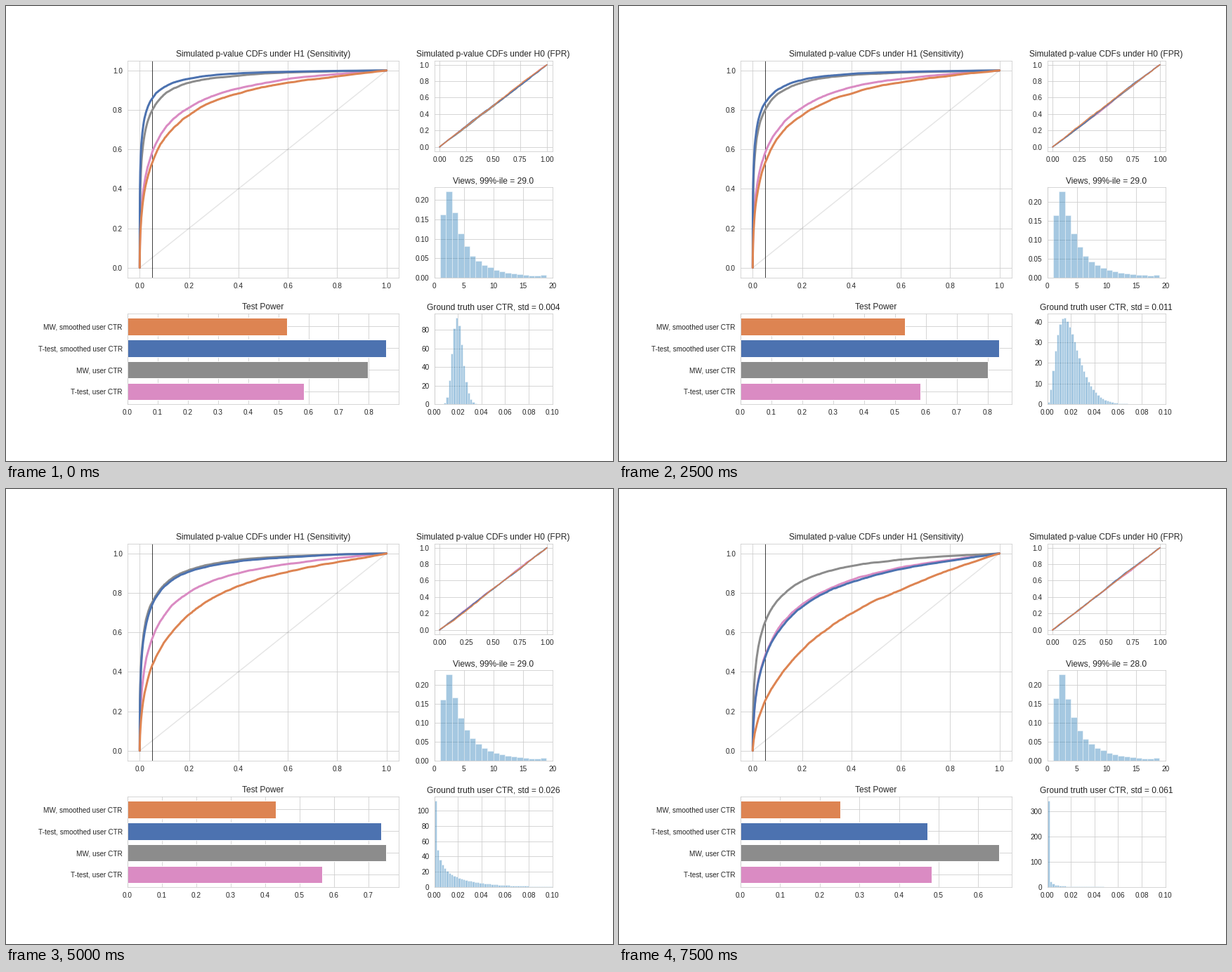
Write a matplotlib script that moves like this. It is 864x648 px and loops after 8 s.

```python
import math

import matplotlib.pyplot as plt
import numpy as np
from matplotlib.animation import FuncAnimation
from matplotlib.gridspec import GridSpec

FRAMES = 16
CTR = 0.02
PINK, GRAY, BLUE, ORANGE = COLORS = "#da8bc3", "#8c8c8c", "#4c72b0", "#dd8452"
TESTS = ["T-test, user CTR", "MW, user CTR",
         "T-test, smoothed user CTR", "MW, smoothed user CTR"]

# Power of each test at a few steps of the skew sweep
STEPS = [0, 2, 5, 7, 9, 12, 15]
POWER = [
    [0.584, 0.585, 0.5815, 0.5975, 0.573, 0.554, 0.482],
    [0.796, 0.786, 0.800, 0.783, 0.763, 0.7285, 0.652],
    [0.8567, 0.853, 0.8358, 0.8265, 0.786, 0.6435, 0.4715],
    [0.5296, 0.5155, 0.531, 0.4897, 0.4578, 0.379, 0.2524],
]
LOW_TAIL = {1, 2, 3, 12, 13, 14, 15}  # steps whose 99th percentile is 28

plt.rcParams.update({
    "font.family": "Liberation Sans",
    "text.color": "0.15",
    "axes.edgecolor": "0.8",
    "axes.linewidth": 0.8,
    "axes.titlesize": 12,
    "axes.axisbelow": True,
    "axes.grid": True,
    "grid.color": "0.8",
    "grid.linewidth": 0.8,
    "xtick.bottom": False,
    "ytick.left": False,
    "xtick.color": "0.15",
    "ytick.color": "0.15",
    "xtick.labelsize": 10,
    "ytick.labelsize": 10,
    "lines.solid_capstyle": "round",
})


@np.vectorize
def phi(z):
    return 0.5 * math.erfc(-z / math.sqrt(2))


Z_TABLE = np.linspace(-4, 4, 2001)
PHI_TABLE = phi(Z_TABLE)
Z = np.linspace(6, 0, 500)
P = 2 * phi(-Z)
P[0] = 0


def bridge(cdf, pins, rng, n):
    """Sampling noise of an empirical CDF, zero at the pinned levels."""
    steps = rng.normal(size=cdf.size) * np.sqrt(np.diff(cdf, prepend=0))
    walk = np.cumsum(steps)
    at_pins = np.interp(pins, cdf, walk)
    return (walk - np.interp(cdf, pins, at_pins)) / math.sqrt(n)


def p_value_cdf(power, rng):
    shift = 1.96 + np.interp(power, PHI_TABLE, Z_TABLE)
    cdf = phi(shift - Z) + phi(-shift - Z)
    cdf[0], cdf[-1] = 0, 1
    noisy = cdf + bridge(cdf, [0, power, 1], rng, 8000)
    return np.clip(np.maximum.accumulate(noisy), 0, 1)


def views_density(rng):
    """Floored log-normal views below 20, the last bin holding 18 and 19."""
    tops = np.log(np.append(np.arange(1, 18), 19)) - 1
    mass = np.diff(phi(tops), prepend=0)
    return rng.multinomial(50000, mass / mass.sum()) / 50000


def beta_density(a, b, edges):
    """Bin averages of Beta(a, b), integrated over u = x**a."""
    u = edges ** a
    width = np.diff(u)
    mid = (np.arange(30) + 0.5) / 30
    x = (u[:-1, None] + width[:, None] * mid) ** (1 / a)
    log_norm = math.lgamma(a + b) - math.lgamma(a + 1) - math.lgamma(b)
    mass = ((1 - x) ** (b - 1)).mean(axis=1) * width * math.exp(log_norm)
    return mass / np.diff(edges)


def hist(ax, edges, density, xlim, title):
    ax.bar(edges[:-1], density, np.diff(edges), align="edge",
           color="#1f77b4", edgecolor="white", linewidth=1, alpha=0.4)
    ax.set(xlim=xlim, ylim=(0, density.max() * 1.05), title=title)


def draw(step):
    rng = np.random.default_rng(100 + step)
    power = [np.interp(step, STEPS, values) for values in POWER]
    for ax in axes:
        ax.clear()

    h1.plot([0, 1], [0, 1], color="black", alpha=0.1, lw=1.5)
    h1.axvline(0.05, color="black", alpha=0.75, lw=1)
    for color, value in zip(COLORS, power):
        h1.plot(P, p_value_cdf(value, rng), color=color, lw=3)
        h0.plot(P, P + bridge(P, [0, 1], rng, 4000), color=color, lw=1.5)
    h1.set_title("Simulated p-value CDFs under H1 (Sensitivity)")
    h0.set_title("Simulated p-value CDFs under H0 (FPR)")
    for ax in (h1, h0):
        ax.set(xlim=(-0.05, 1.05), ylim=(-0.05, 1.05))

    bars.barh(TESTS, power, color=COLORS, edgecolor="white", linewidth=1)
    bars.set(xlim=(0, max(power) * 1.05), ylim=(-0.59, 3.59),
             title="Test Power")

    tail = 28.0 if step in LOW_TAIL else 29.0
    hist(views, np.arange(1.0, 20), views_density(rng), (0, 20),
         f"Views, 99%-ile = {tail}")

    size = 1040 * math.exp(-0.3652 * step)
    std = math.sqrt(CTR * (1 - CTR) / (size + 1))
    edges = np.linspace(0, 0.1, 51)
    hist(truth, edges, beta_density(CTR * size, (1 - CTR) * size, edges),
         (0, 0.1), f"Ground truth user CTR, std = {std:.3f}")
    return []


fig = plt.figure(figsize=(12, 9), dpi=72, facecolor="white")
grid = GridSpec(3, 3, figure=fig, left=0.2, right=0.9, top=0.88, bottom=0.125,
                wspace=0.3, hspace=0.4)
axes = [fig.add_subplot(cell) for cell in
        (grid[:2, :2], grid[0, 2], grid[1, 2], grid[2, :2], grid[2, 2])]
h1, h0, views, bars, truth = axes

anim = FuncAnimation(fig, draw, frames=FRAMES, init_func=lambda: draw(0),
                     interval=500, repeat=True, repeat_delay=0)
plt.show()
```
